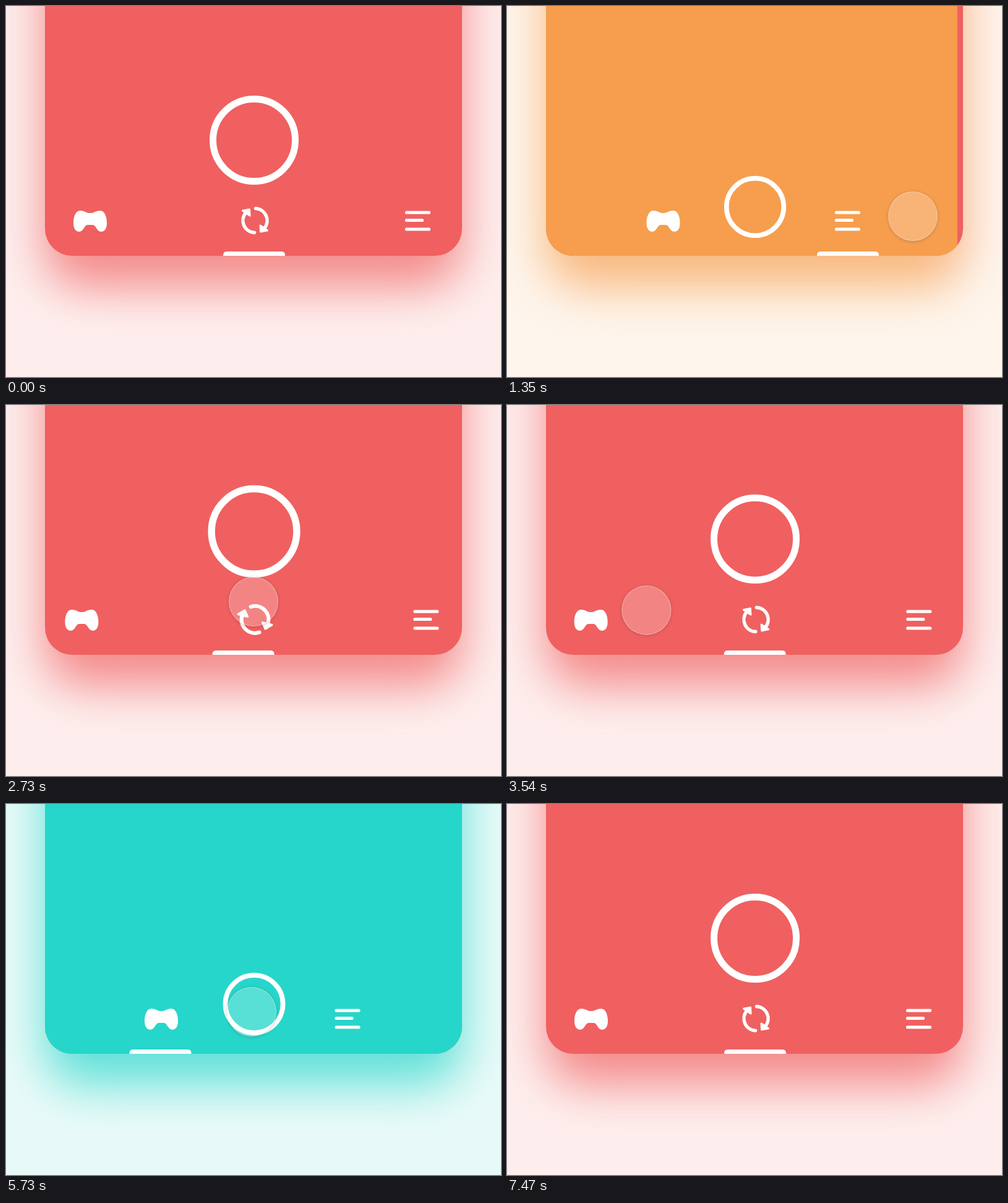
Recreate the animation shown at these times as an HTML page. Size 800 by 600 pixels, loop 7970 ms.

```html
<!DOCTYPE html>
<html lang="en">
<head>
<meta charset="utf-8">
<title>Camera navigation</title>
<style>
  html, body { margin: 0; width: 100%; height: 100%; overflow: hidden; }
  #stage { position: relative; width: 800px; height: 600px; overflow: hidden; background: #fdeeed; }
  #stage > * { position: absolute; }
  #tint { inset: 0; }
  .page { left: 63px; width: 674px; overflow: hidden; background: #f06060; }
  .sheet { width: 100%; height: 100%; }
  #glow { top: -160px; height: 614px; border-radius: 60px; filter: blur(38px); opacity: .7; }
  #card { top: -120px; height: 524px; border-radius: 44px; }
  svg { left: 0; top: 0; }
  #touch { left: -40px; top: -40px; width: 80px; height: 80px; box-sizing: border-box; border-radius: 50%;
    background: rgba(255, 255, 255, .23); border: 1.2px solid rgba(255, 235, 230, .4);
    box-shadow: 0 1px 5px rgba(60, 40, 40, .25); }
</style>
</head>
<body>
<div id="stage">
  <div id="tint"></div>
  <div id="glow" class="page"><div class="sheet"></div></div>
  <div id="card" class="page"><div class="sheet"></div></div>
  <svg width="800" height="600" fill="none" stroke-linecap="round" stroke-linejoin="round">
    <circle id="ring" r="66.5" stroke="#fff" stroke-width="11"/>
    <path id="pad" fill="#fff" d="M-16-17C-8-17-7-13 0-13S8-17 16-17C24-17 27-6 27 3C27 12 23 17 18 17C10 17 10 6 4 6H-4C-10 6-10 17-18 17C-23 17-27 12-27 3C-27-6-24-17-16-17Z"/>
    <path id="menu" stroke="#fff" stroke-width="5.2" d="M-18-14H18M-18-1.5H7M-18 13H18"/>
    <g id="swap" stroke="#fff">
      <g id="arrow">
        <path stroke-width="5.4" d="M1-19.5A19.5 19.5 0 0 1 15 12.5"/>
        <path stroke-width="3" fill="#fff" d="M8.5 8L20 16L9 18Z"/>
      </g>
      <use href="#arrow" transform="rotate(180)"/>
    </g>
    <path id="bar" fill="#fff" d="M-50 404V403Q-50 397-44 397H44Q50 397 50 403V404Z"/>
  </svg>
  <div id="touch"></div>
</div>
<script>
const $ = id => document.getElementById(id);
const sheets = document.querySelectorAll('.sheet');
const LOOP = 7970, LAST = 7470, STEP = 30;
const TAP = 810, GAP = 1640;      // first tap, time between taps
const LEAD = 764, MOVE = 690;     // the finger sets off before each tap
const stops = [[845, 530], [656, 340], [400, 318], [140, 354], [397, 336]];
const exit = { from: 6700, to: 7450, at: [850, 540] };

// Step response of an underdamped spring
function spring(ms) {
  if (ms <= 0) return 0;
  const w = 10.8, z = .51, t = ms / 1000, k = Math.sqrt(1 - z * z), a = w * k * t;
  return 1 - Math.exp(-z * w * t) * (Math.cos(a) + z / k * Math.sin(a));
}

const mix = (a, b, u) => a + (b - a) * u;
const between = (a, b, u) => [mix(a[0], b[0], u), mix(a[1], b[1], u)];
const clamp = u => Math.max(0, Math.min(1, u));

function finger(t) {
  if (t > exit.from) {
    const u = clamp((t - exit.from) / (exit.to - exit.from));
    return between(stops[4], exit.at, u * u);
  }
  const leg = Math.max(0, Math.min(3, Math.floor((t - TAP + LEAD) / GAP)));
  const u = clamp((t - TAP + LEAD - leg * GAP) / MOVE);
  const e = 1 - (1 - u) ** 3;
  const [x, y] = between(stops[leg], stops[leg + 1], e);
  return [x, y - (leg ? 12 * Math.sin(Math.PI * e) : 0)];
}

const place = (id, x, y, extra = '') =>
  $(id).setAttribute('transform', `translate(${x} ${y}) ${extra}`);

function draw(t) {
  const since = n => spring(t - TAP - n * GAP);
  const left = t >= TAP + 2 * GAP;
  const p = left ? since(2) - since(3) : since(0) - since(1);

  for (const s of sheets) {
    s.style.background = left ? '#26d6ca' : '#f69e4e';
    s.style.transform = `translateX(${674 * (1 - p)}px)`;
  }
  $('tint').style.background = left ? '#e8faf8' : '#fef5ec';
  $('tint').style.opacity = clamp(p);

  place('ring', 401, 217 + 106.5 * p, `scale(${1 - .3 * p})`);
  place('pad', 136 + 115 * p, 348);
  place('menu', 665.5 - 113.5 * p, 348);
  place('bar', 401 + (left ? -151.5 : 148) * p, 0);
  place('swap', 402.5, 347, `rotate(${180 * p}) scale(${Math.max(0, 1 - p)})`);
  $('swap').setAttribute('opacity', clamp(1 - p));

  const [x, y] = finger(t);
  $('touch').style.transform = `translate(${x}px, ${y}px)`;
}

const start = performance.now();
function tick() {
  const t = (performance.now() - start) % LOOP;
  draw(Math.min(LAST, Math.floor(t / STEP) * STEP));
  requestAnimationFrame(tick);
}
tick();
</script>
</body>
</html>
```
